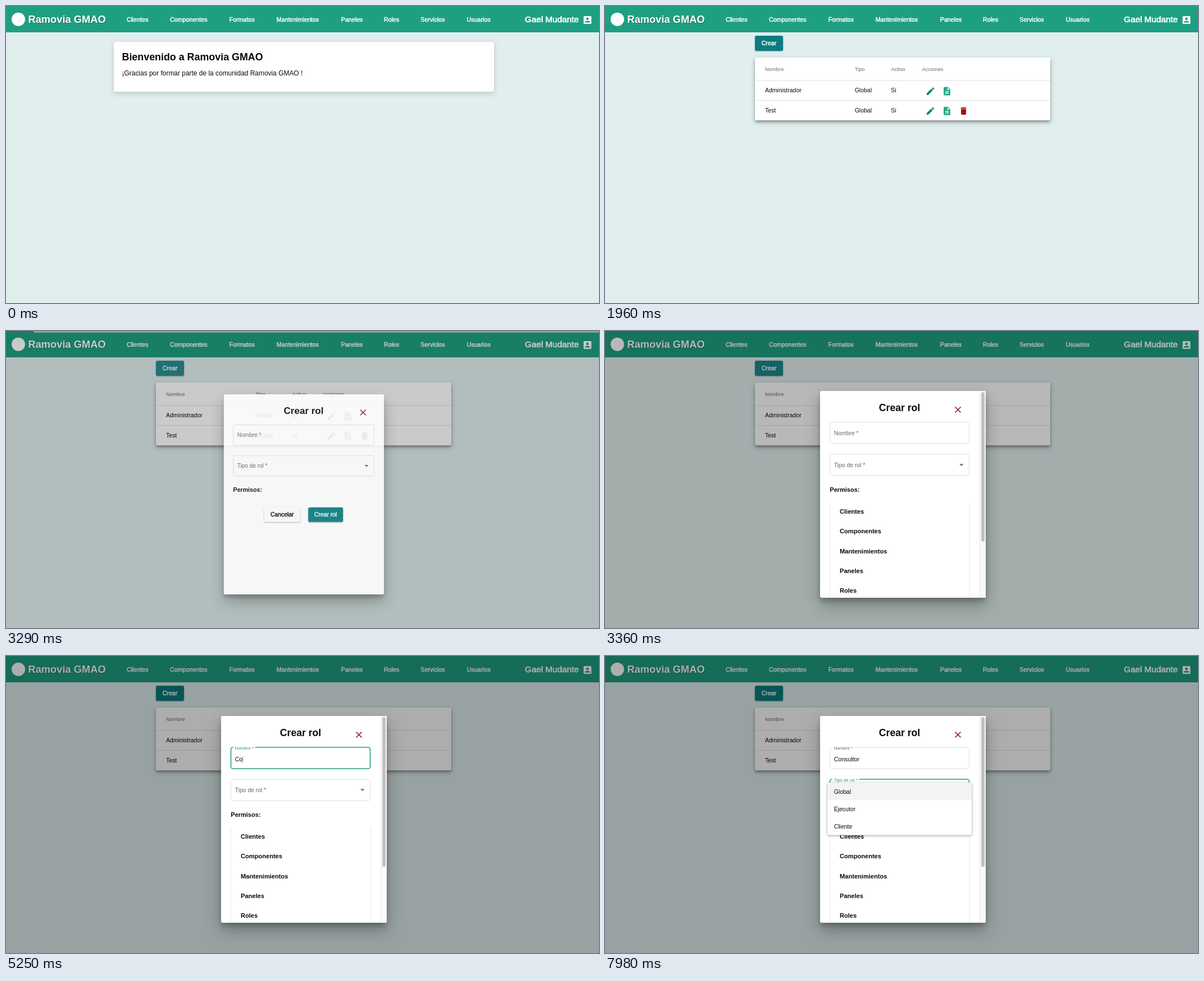
These frames come from a looping animation (1056 px wide and 530 px high, 8 s). An HTML page:

```html
<!DOCTYPE html>
<html lang="es">
<head>
<meta charset="utf-8">
<title>Roles</title>
<style>
  html, body { margin: 0; width: 100%; height: 100%; overflow: hidden; background: #e0efee; }
  svg { display: block; width: 1056px; height: 530px; }
  text { font-family: "Liberation Sans", Arial, sans-serif; white-space: pre; }
  .bold { font-weight: 700; }
  .medium { stroke: currentColor; stroke-width: .042em; }
  .brand { filter: drop-shadow(1px 1px .6px rgba(0, 0, 0, .28)); }
  .card { filter: drop-shadow(0 3px 5px rgba(0, 0, 0, .17)); }
  .table { filter: drop-shadow(0 3px 2px rgba(0, 0, 0, .26)) drop-shadow(0 3px 4.5px rgba(0, 0, 0, .2)); }
  .button { filter: drop-shadow(0 1.3px 1px rgba(0, 0, 0, .32)); }
  .pressed { filter: drop-shadow(0 3px 2px rgba(0, 0, 0, .26)) drop-shadow(0 2px 4px rgba(0, 0, 0, .18)); }
  .sheet { filter: drop-shadow(0 6px 4px rgba(0, 0, 0, .2)) drop-shadow(0 12px 14px rgba(0, 0, 0, .28)); }
  .menu { filter: drop-shadow(0 1.5px 2px rgba(0, 0, 0, .4)); }
</style>
</head>
<body>
<svg id="stage" viewBox="0 0 1056 530" xmlns="http://www.w3.org/2000/svg"></svg>
<script>
const LOOP = 8000;
const GREEN = '#1f9f81', TEAL = '#0a7d80', GREY = '#666', LINE = '#e0e0e0';
const STANDARD = [0.25, 0.8, 0.25, 1], DECEL = [0, 0, 0.2, 1];

const ICONS = {
  user: 'M3 5v14c0 1.1.89 2 2 2h14c1.1 0 2-.9 2-2V5c0-1.1-.9-2-2-2H5c-1.11 0-2 .9-2 2zm12 4c0 1.66-1.34 3-3 3s-3-1.34-3-3 1.34-3 3-3 3 1.34 3 3zm-9 8c0-2 4-3.1 6-3.1s6 1.1 6 3.1v1H6v-1z',
  edit: 'M3 17.25V21h3.75L17.81 9.94l-3.75-3.75L3 17.25zM20.71 7.04c.39-.39.39-1.02 0-1.41l-2.34-2.34c-.39-.39-1.02-.39-1.41 0l-1.83 1.83 3.75 3.75 1.83-1.83z',
  file: 'M14 2H6c-1.1 0-2 .9-2 2v16c0 1.1.9 2 2 2h12c1.1 0 2-.9 2-2V8l-6-6zm2 16H8v-2h8v2zm0-4H8v-2h8v2zm-3-5V3.5L18.5 9H13z',
  bin: 'M6 19c0 1.1.9 2 2 2h8c1.1 0 2-.9 2-2V7H6v12zM19 4h-3.5l-1-1h-5l-1 1H5v2h14V4z'
};

// Drawing helpers
const text = (x, y, size, str, { fill = '#0a0a0a', cls = '', anchor = 'start', id = '' } = {}) =>
  `<text x="${x}" y="${y}" font-size="${size}" fill="${fill}" color="${fill}" class="${cls}" text-anchor="${anchor}" id="${id}">${str}</text>`;
const rect = (x, y, w, h, fill, extra = '') =>
  `<rect x="${x}" y="${y}" width="${w}" height="${h}" fill="${fill}" ${extra}/>`;
const icon = (name, cx, cy, scale, fill) =>
  `<path d="${ICONS[name]}" fill="${fill}" transform="translate(${cx} ${cy}) scale(${scale}) translate(-12 -12)"/>`;
const group = (id, body, extra = '') => `<g id="${id}" ${extra}>${body}</g>`;
const white = { fill: '#fff', cls: 'medium' };

function header() {
  const items = [['Clientes', 215], ['Componentes', 292], ['Formatos', 397.7], ['Mantenimientos', 481.7],
    ['Paneles', 596.8], ['Roles', 673], ['Servicios', 738.3], ['Usuarios', 820.6]];
  return rect(0, 0, 1056, 47, GREEN) +
    '<circle cx="22" cy="23.7" r="12" fill="#fff"/>' +
    text(39.5, 30.2, 18.3, 'Ramovia GMAO', { fill: '#fff', cls: 'bold brand' }) +
    items.map(([name, x]) => text(x, 27.7, 10.7, name, white)).join('') +
    rect(661, 11, 51, 26, '#fff', 'id="navRipple" rx="3"') +
    text(924, 29.3, 15.3, 'Gael Mudante', white) +
    icon('user', 1035.5, 25, 0.77, '#fff');
}

function welcome() {
  return rect(192, 64, 677, 89, '#fff', 'rx="4" class="card"') +
    text(206.5, 96.8, 17.86, 'Bienvenido a Ramovia GMAO', { cls: 'bold' }) +
    text(206.5, 123.5, 11.95, '¡Gracias por formar parte de la comunidad Ramovia GMAO !');
}

function row(name, y, removable) {
  return text(285, y, 10.5, name) + text(444.7, y, 10.5, 'Global') + text(509.3, y, 10.5, 'Si') +
    icon('edit', 579.5, y - 2.4, 0.74, '#0d8272') + icon('file', 609, y - 2.4, 0.74, '#2aa587') +
    (removable ? icon('bin', 638.5, y - 2.4, 0.74, '#a50d0d') : '');
}

function roles() {
  const heads = [['Nombre', 285], ['Tipo', 444.7], ['Activo', 509.3], ['Acciones', 564.5]];
  return rect(267, 53, 50, 27, TEAL, 'rx="3" id="create"') +
    '<clipPath id="pill"><rect x="267" y="53" width="50" height="27" rx="3"/></clipPath>' +
    '<g clip-path="url(#pill)"><circle id="ripple" cx="283" cy="73" r="1" fill="#fff"/></g>' +
    text(292, 70.2, 10.7, 'Crear', { ...white, anchor: 'middle' }) +
    rect(267, 92, 526, 112, '#fff', 'rx="2" class="table"') +
    heads.map(([name, x]) => text(x, 115.6, 9.4, name, { fill: '#6b6b6b' })).join('') +
    rect(267, 132.5, 526, 1, LINE) +
    group('rows', rect(267, 168, 526, 1, LINE) + row('Administrador', 154.4, false) + row('Test', 189.8, true));
}

function field(id, y, right, label) {
  return rect(400.5, y, right - 401, 38, 'none', `rx="3.5" stroke="${LINE}" id="${id}Box"`) +
    rect(404.5, y - 1.5, 0, 3.5, '#fff', `id="${id}Gap"`) +
    text(0, 0, 10.4, label, { fill: GREY, id: id + 'Label' });
}

// The form is narrower once its scrollbar is there.
function form(id, right) {
  const mid = (400 + right) / 2;
  return text(mid, 143, 17.6, 'Crear rol', { cls: 'bold', anchor: 'middle' }) +
    `<path d="M${right - 25.5} 135.5l10 10m0-10l-10 10" stroke="#8e1010" stroke-width="1.5"/>` +
    field(id + 'Name', 163, right, 'Nombre *') +
    field(id + 'Type', 220, right, 'Tipo de rol *') +
    `<path d="M${right - 18} 237.2h7.4l-3.7 3.9z" fill="#6b6b6b"/>` +
    text(400.3, 287.2, 11, 'Permisos:', { cls: 'bold' });
}

function waiting() {
  return form('w', 660) +
    rect(457.5, 315.5, 66, 27, '#fff', 'rx="3" class="button"') +
    rect(538.5, 315.5, 64, 27, TEAL, 'rx="3" class="button"') +
    text(490.5, 332.7, 10.7, 'Cancelar', { cls: 'medium', anchor: 'middle' }) +
    text(570.5, 332.7, 10.7, 'Crear rol', { ...white, anchor: 'middle' });
}

function ready() {
  const names = ['Clientes', 'Componentes', 'Mantenimientos', 'Paneles', 'Roles'];
  return form('r', 649) +
    text(407.7, 188.3, 10.6, '', { id: 'typed' }) +
    rect(0, 179.5, 0.8, 11, '#3a8f7a', 'id="caret"') +
    rect(399.5, 306, 1, 169, '#e6e6e6') + rect(649, 306, 1, 169, '#e6e6e6') +
    names.map((n, i) => text(418, 325.6 + i * 35.45, 11.1, n, { cls: 'bold' })).join('') +
    rect(667, 107, 11, 369, '#fafafa') + rect(667, 107, 1, 369, '#e8e8e8') +
    rect(670, 109, 6, 267, '#c1c1c1', 'rx="3"');
}

function menu() {
  return rect(396, 226, 257, 93.5, '#fff', 'rx="3" class="menu"') +
    rect(396, 226, 257, 31, '#f3f3f3') +
    ['Global', 'Ejecutor', 'Cliente'].map((n, i) => text(407.7, 245.6 + i * 31, 10.5, n)).join('');
}

document.getElementById('stage').innerHTML =
  rect(0, 0, 1056, 530, '#e0efee') + header() +
  group('welcome', welcome()) + group('roles', roles()) +
  group('progress', rect(0, 0, 1056, 3, '#a3d2c6') + rect(0, 0, 0, 3, GREEN, 'id="bar"')) +
  rect(0, 0, 1056, 530, '#000', 'id="shade"') +
  group('dialog', rect(383, 107, 295, 369, '#fff', 'rx="3" class="sheet"') +
    group('waiting', waiting()) + group('ready', ready())) +
  group('menu', menu());

const el = {};
document.querySelectorAll('[id]').forEach(n => { if (n.id) el[n.id] = n; });
const set = (id, attrs) => { for (const k in attrs) el[id].setAttribute(k, attrs[k]); };
const show = (id, on) => set(id, { visibility: on ? 'inherit' : 'hidden' });

// Timing helpers
const clamp = v => Math.min(1, Math.max(0, v));
const mix = (a, b, p) => a + (b - a) * p;
const blend = (a, b, p) => `rgb(${a.map((v, i) => Math.round(mix(v, b[i], p)))})`;
const lin = (t, start, dur) => clamp((t - start) / dur);
function ease(t, start, dur, [x1, y1, x2, y2]) {
  const x = lin(t, start, dur);
  if (x === 0 || x === 1) return x;
  const at = (u, a, b) => 3 * u * (1 - u) * (1 - u) * a + 3 * u * u * (1 - u) * b + u * u * u;
  let lo = 0, hi = 1;
  for (let i = 0; i < 24; i++) {
    const m = (lo + hi) / 2;
    if (at(m, x1, x2) < x) lo = m; else hi = m;
  }
  return at(lo, y1, y2);
}

const RGB = { line: [224, 224, 224], dark: [50, 50, 50], green: [31, 159, 129], grey: [102, 102, 102] };
const CLICK = { nav: 1530, create: 3075, open: 3204, name: 4330, type: 7545 };
const WORD = 'Consultor';
const KEYS = [4960, 5240, 5450, 5590, 5795, 6430, 6780, 6920, 6995];
const CARET_START = 4395;

function setField(id, y, gap, { lift = 0, hover = 0, focus = false, tint = 0 }) {
  set(id + 'Box', {
    stroke: focus ? GREEN : blend(RGB.line, RGB.dark, hover),
    'stroke-width': focus ? 1.6 : 1 + hover * 0.4
  });
  set(id + 'Gap', { width: gap * lift });
  set(id + 'Label', {
    transform: `translate(407.7 ${mix(y + 22.7, y + 3.9, lift)}) scale(${mix(1, 0.76, lift)})`,
    fill: blend(RGB.grey, RGB.green, tint)
  });
}

function draw(t) {
  // Page change and loading bar
  show('welcome', t < 1600);
  show('roles', t >= 1600);
  show('rows', t >= 1740);
  set('navRipple', { opacity: 0.13 * lin(t, CLICK.nav, 70) * (1 - lin(t, 1680, 280)) });
  const load = [[1600, 1815], [3205, 3352]].find(([a, b]) => t >= a && t < b);
  show('progress', !!load);
  if (load) set('bar', { width: Math.max(0, (t - load[0] - 15) * 0.7) });

  // Create button and dialog
  set('create', { class: t >= CLICK.create && t < 3260 ? 'pressed' : 'button' });
  set('ripple', {
    r: 40 * ease(t, CLICK.create, 150, DECEL),
    opacity: t < CLICK.create ? 0 : 0.18 * (1 - lin(t, 3230, 220))
  });
  set('shade', { opacity: 0.32 * ease(t, CLICK.open, 400, STANDARD) });
  const open = ease(t, CLICK.open, 150, DECEL);
  show('dialog', open > 0);
  set('dialog', {
    opacity: open,
    transform: `translate(530.5 291) scale(${mix(0.7, 1, open)}) translate(-530.5 -291)`
  });
  show('waiting', t < 3352);
  show('ready', t >= 3352);

  // Fields
  const inName = t >= CLICK.name && t < CLICK.type, inType = t >= CLICK.type;
  setField('wName', 163, 0, {});
  setField('wType', 220, 0, {});
  setField('rName', 163, 39, {
    lift: ease(t, CLICK.name, 400, STANDARD),
    hover: inType ? 0 : lin(t, 4040, 160) * 0.9,
    focus: inName,
    tint: lin(t, CLICK.name, 200) * (1 - lin(t, CLICK.type, 200))
  });
  setField('rType', 220, 48, {
    lift: ease(t, CLICK.type, 400, STANDARD), focus: inType, tint: lin(t, CLICK.type, 200)
  });

  // Typing
  const count = KEYS.filter(k => k <= t).length;
  const word = WORD.slice(0, count);
  if (el.typed.textContent !== word) el.typed.textContent = word;
  const last = count ? KEYS[count - 1] : CARET_START;
  show('caret', inName && Math.floor(Math.max(0, t - last) / 500) % 2 === 0);
  set('caret', { x: 407.7 + (count ? el.typed.getComputedTextLength() : 0) });

  // Select menu
  const drop = ease(t, CLICK.type, 120, DECEL);
  show('menu', drop > 0);
  set('menu', {
    opacity: drop,
    transform: `translate(0 241) scale(1 ${mix(0.8, 1, drop)}) translate(0 -241)`
  });
}

const start = performance.now();
function tick() {
  draw((performance.now() - start) % LOOP);
  requestAnimationFrame(tick);
}
tick();
</script>
</body>
</html>
```
